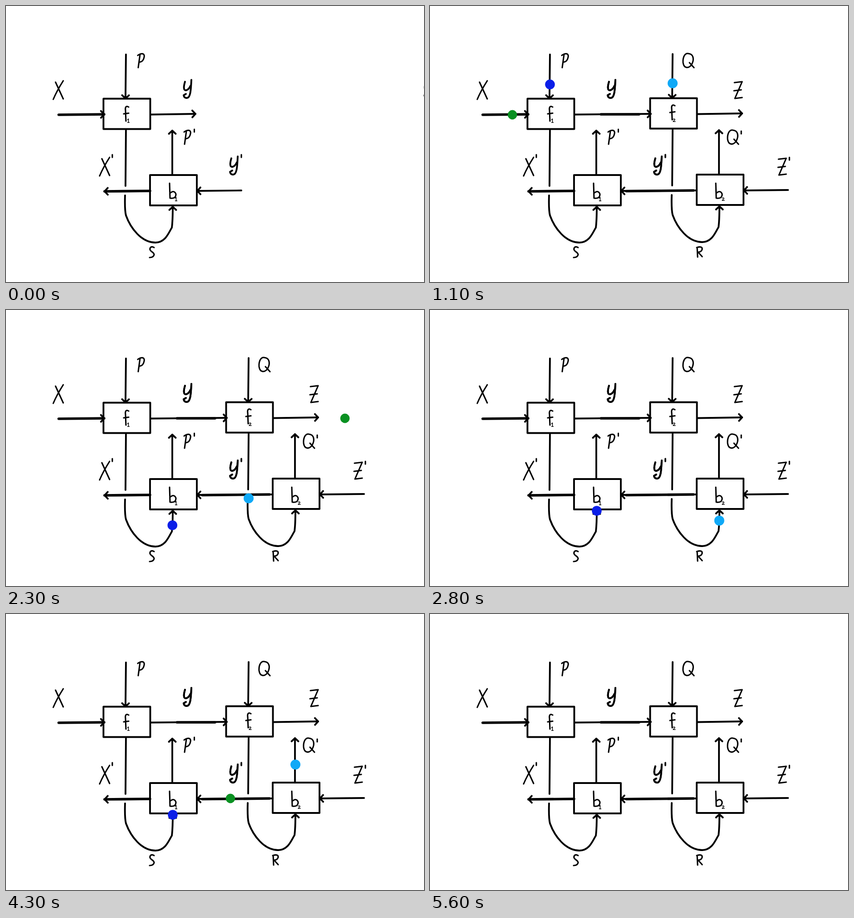
Write an HTML page that moves like this. It is 920x609 px and loops after 6.7 s.

```html
<!DOCTYPE html>
<html lang="en">
<head>
<meta charset="utf-8">
<title>Composed parametric lenses</title>
<style>
html, body { margin: 0; width: 100%; height: 100%; overflow: hidden; background: #fff; }
svg { display: block; }
path, rect { fill: none; stroke: #000; stroke-width: 3.9; stroke-linecap: round; stroke-linejoin: round; }
marker { overflow: visible; }
.to { marker-end: url(#head); }
.thick { stroke-width: 5.6; }
.pen { stroke-width: 3.1; }
.fine { stroke-width: 1.5; }
</style>
</head>
<body>
<svg width="920" height="609" viewBox="0 0 920 609">
  <defs>
    <marker id="head" orient="auto" markerUnits="userSpaceOnUse"><path d="M-7 -7.500L0 0L-7 7.500"/></marker>
    <rect id="box" width="103" height="67" stroke-width="4.400"/>

    <g id="cell">
      <use href="#box" x="214.500" y="204.500"/>
      <use href="#box" x="317" y="373"/>
      <path class="to" d="M264 107L263 204"/>
      <path class="to" d="M366 371V275"/>
      <path d="M264 274L263 397" stroke-width="4.600"/>
      <path id="loop" class="to" stroke-width="4.200"/>
    </g>
    <path id="out" class="to thick" d="M317 408L217 409"/>
    <g id="right">
      <path class="to" d="M318 239.500L417 238"/>
      <path class="to" d="M518 407L421 408"/>
    </g>

    <path id="X" class="pen" d="M126 165Q112 187 104 206M109 168L126 205"/>
    <path id="P" class="pen" d="M295 107L291 136M290 109C297 104 306 103 304 113Q302 123 294 124"/>
    <path id="Y" d="M394 167C391 177 390 186 396 186Q402 185 406 176M408 163C407 180 407 203 398 203Q392 203 391 197L396 194"/>
    <path id="Z" class="pen" d="M670 169L687 167L671 204L687 202M669 187L685 185"/>
    <path id="Q" class="pen" d="M569 105C561 103 556 113 557 125C559 139 570 138 576 129C582 118 580 106 569 105M571 125L581 136"/>
    <path id="f" class="pen" d="M270 223C264 219 262 224 263 230L264 254M259 238L270 236.500"/>
    <path id="b" class="pen" d="M360 391L361 424Q374 426 374 415Q370 405 361 413"/>
    <path id="prime" class="pen" d="M0 -3V3"/>
    <path id="one" class="fine" d="M-2 -2L0 -4V4M-2 4H2"/>
    <path id="two" class="fine" d="M-2 -2Q2 -4 2 -1L-2 3H3"/>
  </defs>

  <use href="#cell"/>
  <path class="to thick" d="M116 240L216 239"/>
  <use href="#out"/>
  <use href="#right" id="open"/>
  <use href="#X"/><use href="#X" x="102" y="169"/><use href="#prime" x="234" y="331"/>
  <use href="#P"/><use href="#P" x="102" y="169"/><use href="#prime" x="414.500" y="275"/>
  <use href="#Y"/><use href="#Y" x="102" y="169"/><use href="#prime" x="518" y="331"/>
  <use href="#f"/><use href="#one" x="269.500" y="253"/>
  <use href="#b"/><use href="#one" x="374.500" y="426"/>
  <path class="pen" d="M326 533C320 529 316 533 317 538C319 543 326 543 326 549Q324 555 316 555"/>

  <g id="second">
    <use href="#cell" x="270" y="-1"/>
    <use href="#right" x="270" y="-1"/>
    <g id="ends">
      <path class="to" d="M394 238H486"/>
      <use href="#out" x="270" y="-1"/>
    </g>
    <use href="#Y"/><use href="#Y" x="102" y="169"/><use href="#prime" x="518" y="331"/>
    <use href="#Q"/><use href="#Q" x="98" y="169"/><use href="#prime" x="685" y="279"/>
    <use href="#Z"/><use href="#Z" x="97" y="169"/><use href="#prime" x="791" y="337"/>
    <use href="#f" x="269" y="-3"/><use href="#two" x="537" y="252"/>
    <use href="#b" x="269"/><use href="#two" x="645" y="426"/>
    <path class="pen" d="M588 533L589 554M587 533Q600 529 599 537Q597 543 590 543L599 553"/>
  </g>

  <g id="joined">
    <path class="to" d="M318 239.500L486 238"/>
    <path class="to" d="M587 407L421 408"/>
    <path class="thick" d="M376 239H460M580 407L432 408.500"/>
  </g>

  <circle id="blue" r="10.800" fill="#0a1ee8"/>
  <circle id="green" r="10.400" fill="#0a9122"/>
  <circle id="sky" r="11" fill="#0fa9f7"/>
</svg>
<script>
const LOOP = 6700, STEP = 100, JOIN = 5, SLIDE = 530;
const BEND = "c10 28 34 60 65 60c22 0 29 -22 36 -33q2 -15 2 -46";
const el = id => document.getElementById(id);
const show = (node, on) => node.setAttribute("visibility", on ? "visible" : "hidden");

el("loop").setAttribute("d", "M262 418Q261 450 264 462" + BEND);

// A dot runs along a path at even speed from one step to another, then may wait.
function leg(dot, d, from, to, until = to) {
  const path = document.createElementNS("http://www.w3.org/2000/svg", "path");
  path.setAttribute("d", d);
  return { dot, path, from, to, until, length: path.getTotalLength() };
}

const legs = [
  leg("green", "M20 240H262", 7, 13),
  leg("green", "M262 239H481", 13, 18),
  leg("green", "M481 239H905", 18, 26),
  leg("green", "M909 407H747", 32, 37),
  leg("green", "M747 407H283", 37, 48),
  leg("green", "M283 408H44", 48, 55),
  leg("blue", "M264 8V462", 7, 18),
  leg("blue", "M264 462" + BEND, 18, 24, 46),
  leg("blue", "M367 443V2", 46, 55),
  leg("sky", "M534 8V199", 7, 11.7, 18),
  leg("sky", "M534 199V462" + BEND + "m0 20", 18, 28.5, 31),
  leg("sky", "M637 463V442", 31, 32, 40.6),
  leg("sky", "M637 442V44", 40.6, 49.3)
];

function draw(time) {
  const step = Math.floor(time % LOOP / STEP);
  const joined = step >= JOIN;
  el("second").setAttribute("transform", `translate(${SLIDE * Math.max(0, 1 - step / JOIN)})`);
  show(el("open"), !joined);
  show(el("ends"), !joined);
  show(el("joined"), joined);
  for (const id of ["blue", "green", "sky"]) {
    const on = legs.find(l => l.dot === id && step >= l.from && step <= l.until);
    show(el(id), on);
    if (!on) continue;
    const part = Math.min(1, (step - on.from) / (on.to - on.from));
    const { x, y } = on.path.getPointAtLength(part * on.length);
    el(id).setAttribute("transform", `translate(${x} ${y})`);
  }
}

const start = performance.now();
function tick() {
  draw(performance.now() - start);
  requestAnimationFrame(tick);
}
tick();
</script>
</body>
</html>
```
